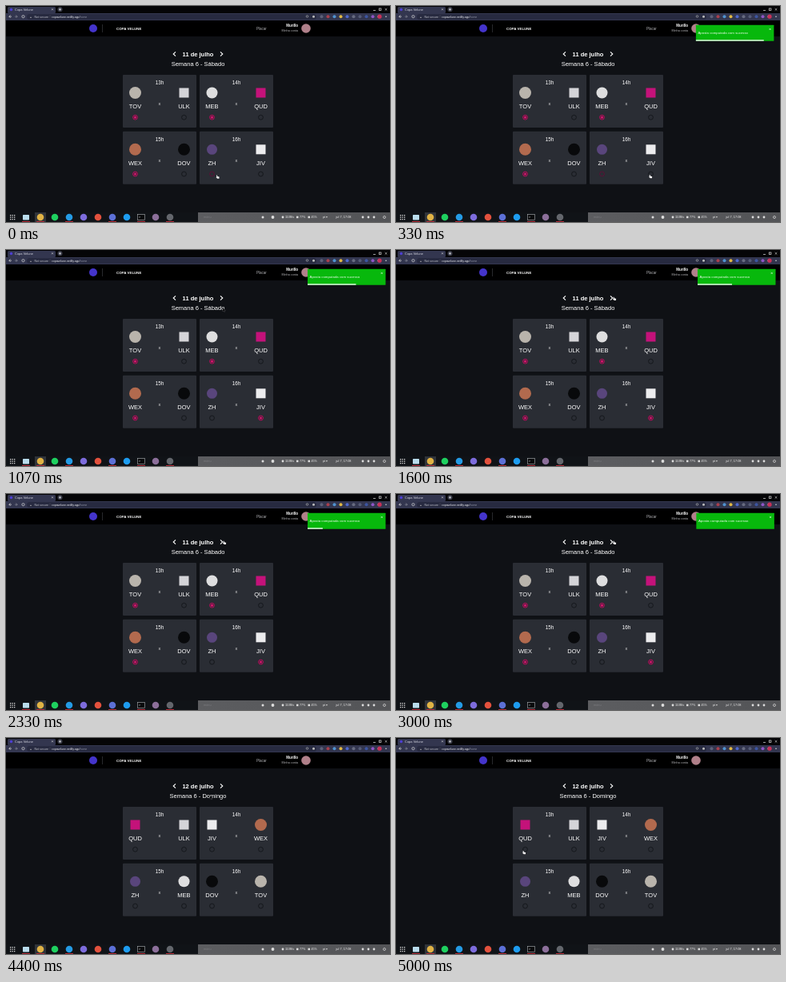
Recreate the animation shown at these times as an HTML page with a canvas. Size 480 by 270 pixels, loop 5.07 s.

```html
<!DOCTYPE html>
<html lang="pt">
<head>
<meta charset="utf-8">
<style>
html, body { margin: 0; width: 100%; height: 100%; overflow: hidden; background: #0f1115; }
canvas { display: block; width: 480px; height: 270px; }
</style>
</head>
<body>
<canvas id="stage"></canvas>
<script>
const LOOP = 5070;
const canvas = document.getElementById('stage');
const ctx = canvas.getContext('2d');
const ratio = window.devicePixelRatio || 1;
canvas.width = 480 * ratio;
canvas.height = 270 * ratio;

const PINK = '#d8106c';
const SANS = '"Liberation Sans", Arial, sans-serif';

// Drawing helpers
function rect(x, y, w, h, color, radius = 0) {
  ctx.fillStyle = color;
  ctx.beginPath();
  ctx.roundRect(x, y, w, h, radius);
  ctx.fill();
}
function disc(x, y, r, color) {
  ctx.fillStyle = color;
  ctx.beginPath();
  ctx.arc(x, y, r, 0, Math.PI * 2);
  ctx.fill();
}
function ring(x, y, r, color, width) {
  ctx.strokeStyle = color;
  ctx.lineWidth = width;
  ctx.beginPath();
  ctx.arc(x, y, r, 0, Math.PI * 2);
  ctx.stroke();
}
function line(points, color, width) {
  ctx.strokeStyle = color;
  ctx.lineWidth = width;
  ctx.beginPath();
  points.forEach(([x, y]) => ctx.lineTo(x, y));
  ctx.stroke();
}
function cross(x, y, r, color) {
  line([[x - r, y - r], [x + r, y + r]], color, 0.6);
  line([[x - r, y + r], [x + r, y - r]], color, 0.6);
}
function text(str, x, baseline, size, color = '#fff', align = 'left', weight = '') {
  ctx.font = `${weight} ${size}px ${SANS}`;
  ctx.textAlign = align;
  ctx.fillStyle = color;
  ctx.fillText(str, x, baseline);
}

// Motion helpers
const smooth = p => p * p * (3 - 2 * p);
const easeOut = p => 1 - (1 - p) ** 3;
function track(keys, t, ease) {
  if (t <= keys[0][0]) return keys[0].slice(1);
  for (let i = 1; i < keys.length; i++) {
    const [a, b] = [keys[i - 1], keys[i]];
    if (t <= b[0]) {
      const p = ease((t - a[0]) / (b[0] - a[0]));
      return a.slice(1).map((v, k) => v + (b[k + 1] - v) * p);
    }
  }
  return keys[keys.length - 1].slice(1);
}

// Badge: shape, half size, colour
const TEAMS = {
  TOV: ['disc', 7.5, '#b9b4ac'],
  ULK: ['square', 6, '#d4d4d8'],
  MEB: ['disc', 7, '#dededf'],
  QUD: ['square', 6, '#c4127a'],
  WEX: ['disc', 7.5, '#b26a4e'],
  DOV: ['disc', 7.5, '#08090b'],
  ZH: ['disc', 6.5, '#59457c'],
  JIV: ['square', 6, '#ececee']
};
const SATURDAY = [['TOV', 'ULK'], ['MEB', 'QUD'], ['WEX', 'DOV'], ['ZH', 'JIV']];
const SUNDAY = [['QUD', 'ULK'], ['JIV', 'WEX'], ['ZH', 'MEB'], ['DOV', 'TOV']];

function badge(name, x, y) {
  const [shape, r, color] = TEAMS[name];
  if (shape === 'disc') disc(x, y, r, color);
  else rect(x - r, y - r, r * 2, r * 2, color);
}

// glow: 0 = empty, 1 = chosen
function radio(x, y, glow) {
  ring(x, y, 2.9, '#14161a', 0.9);
  ctx.globalAlpha = glow;
  ring(x, y, 2.9, PINK, 0.9);
  if (glow === 1) disc(x, y, 1.6, PINK);
  ctx.globalAlpha = 1;
}

function match(index, teams, glows) {
  const x = 146 + (index % 2) * 96;
  const y = 86 + Math.floor(index / 2) * 70.8;
  rect(x, y, 92, 66, '#2a2d34', 1);
  text(13 + index + 'h', x + 46, y + 12.2, 6.3, '#fff', 'center');
  text('x', x + 46, y + 38, 5.6, '#ddd', 'center');
  teams.forEach((name, side) => {
    const cx = x + 15.5 + side * 61;
    badge(name, cx, y + 22.5);
    text(name, cx, y + 42, 7.5, '#fff', 'center');
    radio(cx, y + 53.2, glows[side]);
  });
}

function browser() {
  rect(0, 0, 480, 9, '#050507');
  rect(2, 1, 60, 8, '#33364f', 1.5);
  disc(6.5, 4.5, 1.8, '#4d3fd2');
  text('Copa Velune', 11, 5.9, 4, '#dcdce6');
  cross(58, 4.3, 1, '#ddd');
  disc(67.5, 4.3, 3, '#3d3f4c');
  line([[66, 4.3], [69, 4.3]], '#fff', 0.6);
  line([[67.5, 2.8], [67.5, 5.8]], '#fff', 0.6);
  line([[459, 5.5], [462, 5.5]], '#ddd', 0.7);
  ctx.strokeRect(466.3, 3, 2.6, 2.6);
  cross(475, 4.3, 1.3, '#ddd');

  rect(0, 9, 480, 9, '#33364f');
  rect(26, 10, 362, 7, '#272a40', 3.5);
  line([[5.5, 11.5], [3.8, 13.2], [5.5, 14.9]], '#ddd', 0.7);
  line([[3.8, 13.2], [7, 13.2]], '#ddd', 0.7);
  line([[12.5, 11.5], [14.2, 13.2], [12.5, 14.9]], '#8a8b98', 0.7);
  line([[11, 13.2], [14.2, 13.2]], '#8a8b98', 0.7);
  ring(21.5, 13.2, 1.6, '#ddd', 0.7);
  text('▲', 29.5, 14.6, 3, '#bbb');
  text('Not secure', 35.5, 14.6, 3.6, '#c4c4cc');
  line([[55, 11.5], [55, 15]], '#666', 0.4);
  text('copavelune.netlify.app', 57, 14.6, 3.5, '#f0f0f4');
  const end = 57 + ctx.measureText('copavelune.netlify.app').width;
  text('/home', end, 14.6, 3.5, '#9496a6');
  ring(376.5, 13, 1.3, '#bbb', 0.6);
  disc(384.5, 13.2, 1.5, '#bbb');
  ['#5d6178', '#a83f4c', '#4f92cf', '#e0b844', '#4c67cb', '#676b80', '#555b76', '#3c55a0', '#8e55c5', '#d8d8df']
    .forEach((color, i) => disc(394.5 + i * 8, 13.2, 2, color));
  disc(467, 13.2, 2.6, '#c83058');
  disc(475, 13.2, 0.8, '#ddd');
}

function header() {
  rect(0, 18, 480, 20, '#000');
  disc(109, 28, 5, '#4434cb');
  line([[120.5, 23], [120.5, 33]], '#44464c', 0.6);
  text('COPA VELUNE', 138, 29.7, 4.4, '#fff', 'left', 'bold');
  text('Placar', 313, 29.7, 4.5, '#b4b4b8');
  text('Murillo', 365, 25.9, 4.5, '#fff', 'right', 'bold');
  text('Minha conta', 365, 31.5, 3.75, '#b8b8bc', 'right');
  disc(375, 28, 5.8, '#b0808a');
}

function taskbar() {
  rect(0, 258, 480, 12, '#101317');
  rect(36, 258, 14, 12, '#30343a');
  for (let i = 0; i < 9; i++) rect(5 + (i % 3) * 2.5, 261 + Math.floor(i / 3) * 2.5, 1.3, 1.3, '#e5e5e5');
  rect(21, 261, 8, 6.5, '#b9dcec', 0.7);
  ['#e0b345', '#1ed05f', '#249be5', '#7d6cdc', '#e2513d', '#5c70d6', '#1d9cf0', '', '#8c6f9a', '#63666c']
    .forEach((color, i) => color && disc(43 + i * 18, 264, 4.3, color));
  rect(164.5, 260.5, 9, 7, '#090a0c', 0.6);
  ctx.strokeStyle = '#b0b3b6';
  ctx.lineWidth = 0.6;
  ctx.strokeRect(164.5, 260.5, 9, 7);
  text('>', 166, 264.6, 3.5);
  [25, 43, 79, 133, 169, 205].forEach(x => rect(x - 5, 269, 10, 1, '#b22a35'));

  const shade = ctx.createLinearGradient(240, 0, 480, 0);
  shade.addColorStop(0, '#5c5d60');
  shade.addColorStop(1, '#535457');
  rect(240, 258, 240, 12, shade);
  text('menu', 247, 265.2, 3.8, '#7c7d80');
  disc(321, 264, 1.5, '#ddd');
  disc(333.5, 264, 1.9, '#ddd');
  disc(346, 264, 1.4, '#ddd');
  text('110B/s', 349, 265.3, 3.7, '#eee');
  rect(363, 262.7, 2.5, 2.5, '#ddd');
  text('77%', 367, 265.3, 3.7, '#eee');
  rect(377.5, 262.7, 2.5, 2.5, '#ddd');
  text('45%', 381.5, 265.3, 3.7, '#eee');
  text('pt ▾', 396, 265.3, 3.7, '#eee');
  text('jul 7, 17:08', 412.5, 265.3, 3.9, '#f2f2f2');
  [446, 453, 460].forEach(x => disc(x, 264, 1.4, '#ddd'));
  ring(473, 264, 1.5, '#ddd', 0.7);
}

function page(t) {
  rect(0, 38, 480, 220, '#0f1115');
  const titleChanged = t >= 3150;
  const sunday = t >= 3530;
  line([[212, 57.4], [209.2, 60], [212, 62.6]], '#fff', 1.1);
  line([[268, 57.4], [270.8, 60], [268, 62.6]], '#fff', 1.1);
  text(`${titleChanged ? 12 : 11} de julho`, 240, 62.7, 7.5, '#fff', 'center', 'bold');
  text(`Semana 6 - ${sunday ? 'Domingo' : 'Sábado'}`, 240, 74.8, 7.5, '#fff', 'center');

  const focus = t < 700 ? 0.4 : 0;
  const chosen = [[1, 0], [1, 0], [1, 0], [focus, t >= 380 ? 1 : 0]];
  (sunday ? SUNDAY : SATURDAY).forEach((teams, i) => match(i, teams, sunday ? [0, 0] : chosen[i]));
}

const ENTER = [[0, 750], [400, -6], [500, 2.5], [600, -1.3], [680, 0]];
const LEAVE = [[2900, 0], [2985, -5], [3320, 500]];
function toast(t) {
  if (t <= 0 || t > 3320) return;
  const [shift] = t > 2900 ? track(LEAVE, t, smooth) : track(ENTER, t, easeOut);
  const x = 377 + shift;
  if (x > 480) return;
  ctx.globalAlpha = t > 3010 ? 1 - smooth((t - 3010) / 310) : Math.min(1, t / 300);
  rect(x, 23.8, 97.5, 20, '#07b80c', 0.5);
  text('Aposta computada com sucesso', x + 2.6, 35.1, 4.33, '#effbef');
  cross(x + 92.7, 28.9, 1.1, '#e4f8e4');
  const width = Math.min(97.5, Math.max(0, 0.033 * (2903 - t)));
  rect(x, 42.3, width, 1.5, '#dff6df');
  ctx.globalAlpha = 1;
}

const POINTER = [
  [0, 263, 211.5], [350, 317, 211], [400, 317, 211], [600, 268, 175],
  [1200, 271.5, 58.8], [3850, 271.5, 58.8], [4270, 266, 64], [4400, 255, 72],
  [4800, 170, 132], [5000, 158.5, 141], [5070, 158.5, 141]
];
function pointer(t) {
  const [x, y] = track(POINTER, t, smooth);
  const hand = t < 120 || (t > 330 && t < 430) || (t > 1170 && t < 4200) || t > 4950;
  ctx.save();
  ctx.translate(x, y);
  ctx.beginPath();
  const outline = hand
    ? [[0, 0], [1, 0], [1.3, 1.5], [3.6, 2], [3.5, 4.2], [1.2, 4.2], [-0.7, 2.4], [0.3, 2.2]]
    : [[0, 0], [0, 4.2], [1, 3.3], [1.8, 4.8], [2.4, 4.5], [1.7, 3], [3, 3]];
  outline.forEach(([px, py]) => ctx.lineTo(px, py));
  ctx.closePath();
  ctx.lineWidth = hand ? 0.5 : 0.35;
  ctx.strokeStyle = hand ? '#15171a' : '#a0a0a4';
  ctx.fillStyle = hand ? '#f4f4f5' : '#0b0c0e';
  ctx.stroke();
  ctx.fill();
  ctx.restore();
}

function frame() {
  const t = performance.now() % LOOP;
  ctx.setTransform(ratio, 0, 0, ratio, 0, 0);
  page(t);
  browser();
  header();
  taskbar();
  toast(t);
  pointer(t);
  requestAnimationFrame(frame);
}
frame();
</script>
</body>
</html>
```
